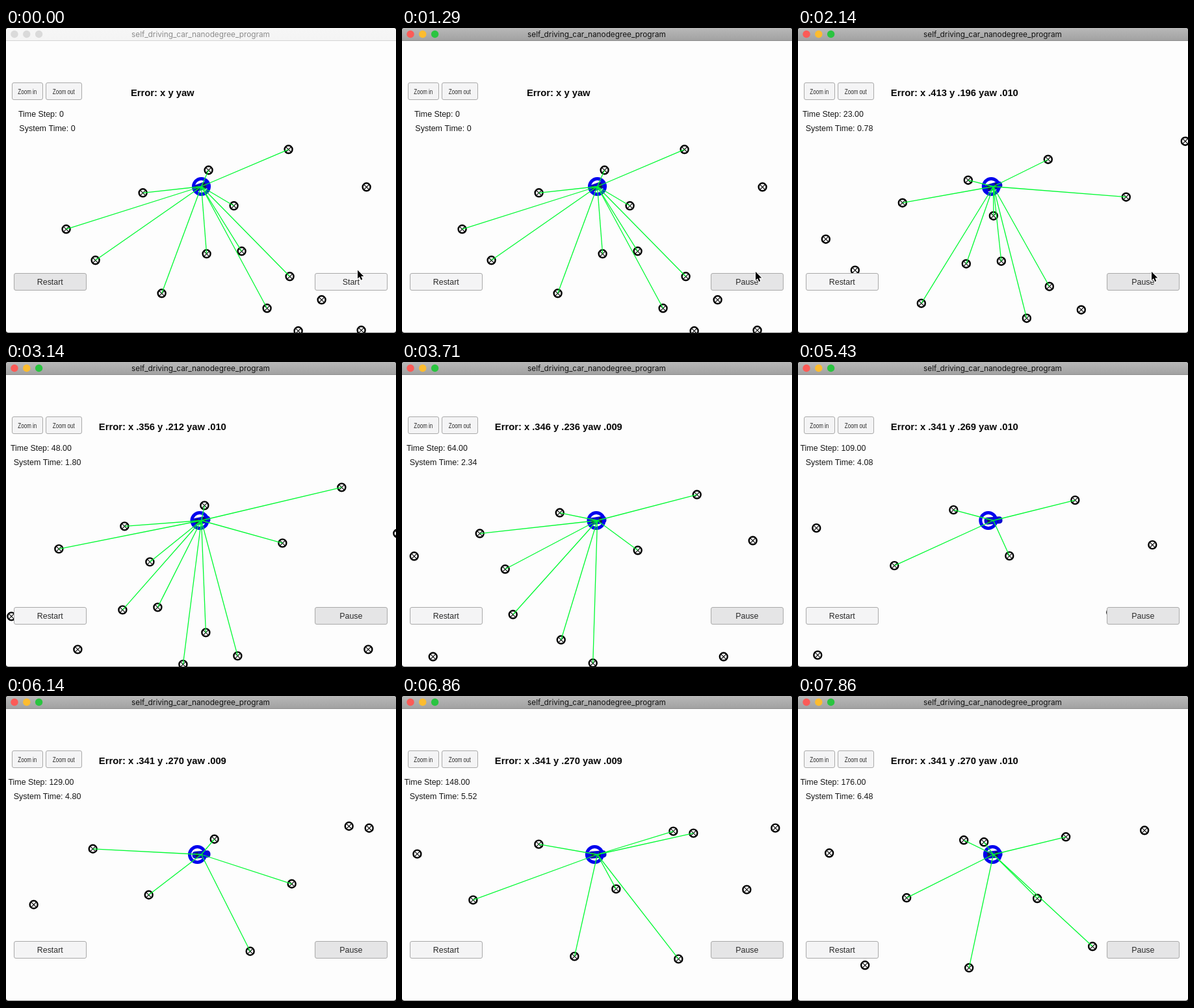
These frames come from a looping animation (600x472 px, 8 s). An HTML page with a canvas:

```html
<!DOCTYPE html>
<html lang="en">
<head>
<meta charset="utf-8">
<title>Particle filter simulator</title>
<style>
  html, body { margin: 0; width: 100%; height: 100%; overflow: hidden; background: #111; }
  canvas { display: block; }
</style>
</head>
<body>
<canvas id="stage" width="600" height="472"></canvas>
<script>
const ctx = document.getElementById('stage').getContext('2d');
const LOOP = 8000, FPS = 7, FOCUS_TICK = 3, START_TICK = 9, CURSOR_END = 18;
const CAR = { x: 300.5, y: 244.5 }, RANGE = 226;
const SANS = '"Liberation Sans", Arial, sans-serif';

// The map, in stage pixels before the car sets off
const landmarks = [
  [434, 187], [311, 219], [210, 254], [350, 274], [92, 310], [137, 358], [308, 348],
  [362, 344], [436, 383], [239, 409], [401, 432], [485, 419], [449, 467], [546, 466],
  [554, 245], [645, 159], [731, 230], [686, 409], [832, 144], [951, 213], [887, 317],
  [1039, 124], [1070, 127], [1196, 119], [1152, 214], [1047, 321], [1317, 109], [1237, 288]
];
// Simulation speed: [tick, time step]
const pace = [[9.5, 0], [15, 23], [22, 48], [31, 84], [38, 109], [48, 148], [55, 176]];

const lerp = (a, b, u) => a + (b - a) * u;

function stepAt(tick) {
  const next = Math.max(1, pace.findIndex(([t]) => t >= tick));
  const [t0, s0] = pace[next - 1], [t1, s1] = pace[next];
  return Math.max(0, lerp(s0, s1, (tick - t0) / (t1 - t0)));
}

// Distance driven: speed levels off to the right, the climb bends gently
const drivenX = s => 1.629 * s + .02443 * s ** 2 - .0000475 * s ** 3;
const drivenY = s => {
  const u = s / 176;
  return -98 * u - 10.4 * Math.sin(Math.PI * u ** .88) ** 2;
};

// The clock advances in whole updates of 60 ms
const systemTime = seconds => .06 * Math.floor((seconds - 1.335) / .06);

// The estimate refreshes at a fixed rate, so it trails by the age of the last refresh
function estimateLag(seconds, speed) {
  const period = .0728, stepsPerSecond = 27;
  const age = period * ((seconds / period + .175) % 1);
  return speed * stepsPerSecond * age;
}

function errorText(s) {
  const short = v => v.toFixed(3).slice(1);
  const x = .341 + .31 * Math.exp(-s / 15.7);
  const y = .193 + .077 / (1 + Math.exp((61 - s) / 12));
  const yaw = .0095 + .0004 * Math.cos(2 * Math.PI * (s - 37) / 64);
  return `Error: x ${short(x)} y ${short(y)} yaw ${short(yaw)}`;
}

function text(str, x, y, font, color = '#161616') {
  ctx.font = font;
  ctx.fillStyle = color;
  ctx.textAlign = 'center';
  ctx.fillText(str, x, y);
}

function circle(x, y, r, fill, stroke, width) {
  ctx.beginPath();
  ctx.arc(x, y, r, 0, 2 * Math.PI);
  if (fill) { ctx.fillStyle = fill; ctx.fill(); }
  if (stroke) { ctx.strokeStyle = stroke; ctx.lineWidth = width; ctx.stroke(); }
}

function line(x1, y1, x2, y2, color, width) {
  ctx.beginPath();
  ctx.moveTo(x1, y1);
  ctx.lineTo(x2, y2);
  ctx.strokeStyle = color;
  ctx.lineWidth = width;
  ctx.stroke();
}

function button(x, y, w, h, label, selected, squeeze = 1) {
  ctx.beginPath();
  ctx.roundRect(x + .5, y + .5, w, h, 2.5);
  ctx.fillStyle = selected ? '#e5e5e6' : '#f4f4f5';
  ctx.fill();
  ctx.strokeStyle = '#a9a9a9';
  ctx.lineWidth = 1;
  ctx.stroke();
  ctx.save();
  ctx.translate(x + w / 2 + .3, y + h / 2 + 4.5);
  ctx.scale(squeeze, 1);
  text(label, 0, 0, `${squeeze < 1 ? 11 : 12.4}px ${SANS}`, '#2a2a2a');
  ctx.restore();
}

function drawLandmark(x, y) {
  circle(x, y, 6, null, '#000', 2.4);
  line(x - 3.5, y - 3.5, x + 3.5, y + 3.5, '#000', 1.1);
  line(x - 3.5, y + 3.5, x + 3.5, y - 3.5, '#000', 1.1);
}

function drawCar(angle, lag) {
  ctx.save();
  ctx.translate(CAR.x, CAR.y);
  ctx.rotate(angle);
  ctx.beginPath();
  ctx.roundRect(-14, -5.5, 28, 11, 4.5);
  ctx.fillStyle = '#0b0bd0';
  ctx.fill();
  ctx.fillStyle = '#15204a';
  ctx.fillRect(-9, -3.5, 4, 7);
  ctx.fillRect(3, -4, 4, 8);
  ctx.restore();
  circle(CAR.x - lag, CAR.y, 12, null, '#0000ee', 5);
}

function drawTitleBar(active) {
  const shade = ctx.createLinearGradient(0, 0, 0, 19);
  shade.addColorStop(0, active ? '#b8b8b8' : '#f6f6f6');
  shade.addColorStop(1, active ? '#a2a2a2' : '#f4f4f4');
  ctx.fillStyle = shade;
  ctx.fillRect(0, 0, 600, 19);
  ctx.fillStyle = active ? '#8c8c8c' : '#d4d4d4';
  ctx.fillRect(0, 19, 600, 1);
  const lights = active ? ['#fc5b57', '#fdbc2f', '#2ac440'] : Array(3).fill('#dadada');
  lights.forEach((color, i) => circle(13 + 18.8 * i, 9.5, 5.7, color));
  text('self_driving_car_nanodegree_program', 299.5, 14, '11.8px Inter, sans-serif',
    active ? '#111' : '#8c8c8c');
}

function drawCursor(x, y) {
  ctx.beginPath();
  [[0, 0], [0, 13], [3, 10.3], [5.2, 15.2], [7.3, 14.2], [5.2, 9.5], [9.3, 9.5]]
    .forEach(([dx, dy]) => ctx.lineTo(x + dx, y + dy));
  ctx.closePath();
  ctx.strokeStyle = '#fff';
  ctx.lineWidth = 2;
  ctx.stroke();
  ctx.fillStyle = '#000';
  ctx.fill();
}

function drawMap(step, seconds) {
  const dx = drivenX(step), dy = drivenY(step);
  const speedX = drivenX(step + 1) - dx, speedY = drivenY(step + 1) - dy;
  const shown = landmarks.map(([x, y]) => [x - dx + .6, y - dy + .3]);
  shown.forEach(([x, y]) => drawLandmark(x, y));
  drawCar(Math.atan2(speedY, speedX), step > 0 ? estimateLag(seconds, speedX) : 0);
  shown.filter(([x, y]) => Math.hypot(x - CAR.x, y - CAR.y) < RANGE)
    .forEach(([x, y]) => line(CAR.x, CAR.y, x, y, '#00fa32', 1.3));
}

function draw(tick) {
  const seconds = tick / FPS, step = stepAt(tick);
  const running = tick >= START_TICK, moving = step > 0;

  ctx.fillStyle = '#111';
  ctx.fillRect(0, 0, 600, 472);
  ctx.save();
  ctx.beginPath();
  ctx.roundRect(0, 0, 600, 470, 4);
  ctx.clip();
  ctx.fillStyle = '#fdfdfd';
  ctx.fillRect(0, 0, 600, 470);
  drawMap(step, seconds);

  text(moving ? errorText(step) : 'Error: x y yaw', 240.8, 105, `bold 14.75px ${SANS}`, '#080808');
  text(`Time Step: ${moving ? Math.round(step).toFixed(2) : 0}`, 53.9, 137, `12.4px ${SANS}`);
  text(`System Time: ${moving ? systemTime(seconds).toFixed(2) : 0}`, 63.5, 159, `12.5px ${SANS}`);

  button(9, 84, 47, 26, 'Zoom in', false, .73);
  button(61, 84, 55, 26, 'Zoom out', false, .73);
  button(12, 378, 111, 26, 'Restart', !running);
  button(475, 378, 111, 26, running ? 'Pause' : 'Start', running);
  drawTitleBar(tick >= FOCUS_TICK);

  if (tick < CURSOR_END) {
    const u = Math.min(tick / START_TICK, 1);
    drawCursor(lerp(541, 544, u), lerp(373.5, 376, u));
  }
  ctx.restore();
}

const origin = performance.now();
function frame() {
  const t = (performance.now() - origin) % LOOP;
  draw(Math.floor((t + 5) * FPS / 1000) % (LOOP * FPS / 1000));
  requestAnimationFrame(frame);
}
frame();
</script>
</body>
</html>
```
